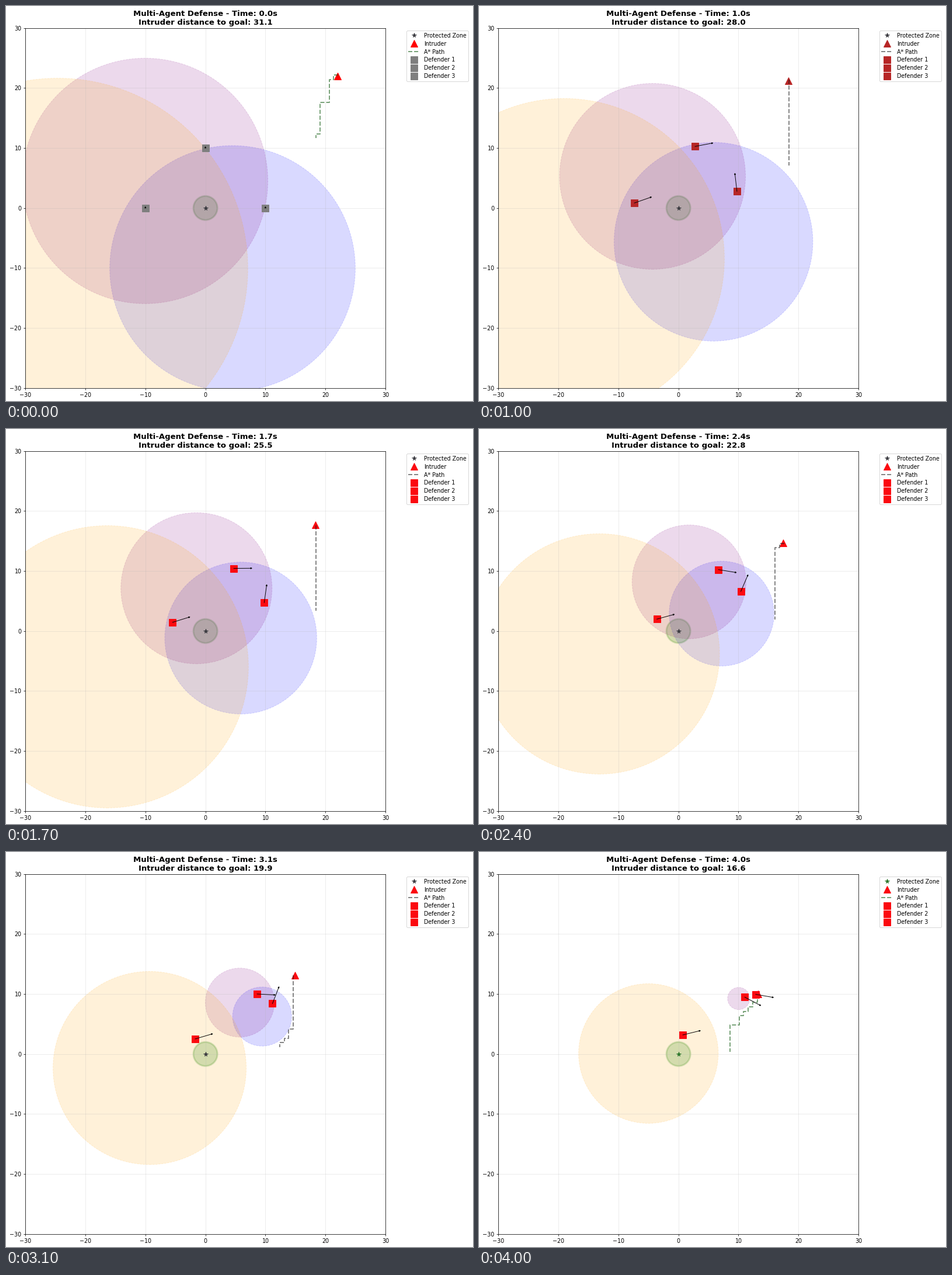
A matplotlib script for the animation above (4100 ms loop, 800 by 676 pixels).

```python
import numpy as np
import matplotlib.pyplot as plt
from matplotlib.animation import FuncAnimation
from matplotlib.patches import Circle, Polygon

DPI = 64
S = 68.4 / DPI          # scale for point sizes
FRAMES, INTERVAL = 41, 100
SPEED = 2.8             # defender speed
RATIO = SPEED / 5.0     # defender speed / intruder speed
CELL = 0.75             # planner grid size
LOOKAHEAD = 19          # planned steps shown

plt.rcParams.update({
    "font.family": "DejaVu Sans", "font.size": 10 * S,
    "axes.linewidth": 0.8 * S, "grid.linewidth": 0.8 * S,
    "patch.linewidth": 1.0 * S, "lines.markeredgewidth": 1.0 * S,
    "axes.titlepad": 6 * S,
})
for axis in ("xtick", "ytick"):
    plt.rcParams.update({f"{axis}.major.size": 3.5 * S,
                         f"{axis}.major.pad": 3.5 * S,
                         f"{axis}.major.width": 0.8 * S})

# Intruder key points: frame, x, y
KEYS = [(0, 22, 22), (8, 18.01, 22.12), (10, 18.3, 21.18),
        (20, 18.37, 16.18), (24, 17.41, 14.69), (31, 14.93, 13.12),
        (40, 13.27, 9.97)]

# Planned route from a given frame on: steps that go left, the rest go down
LEFT_TURNS = {0: (0, 2, 8, 9, 17), 3: (0, 2, 11, 18), 9: (), 21: (0, 2),
              28: (12, 15, 17), 36: (2, 4, 6, 8, 11, 12)}


def intercept(pos, target):
    """First point on the line from intruder to goal the defender can hold."""
    to_goal = -target / np.hypot(*target)
    gap = target - pos
    a, b, c = 1 - RATIO**2, 2 * gap @ to_goal, gap @ gap
    run = (-b - np.sqrt(max(b * b - 4 * a * c, 0))) / (2 * a)
    return target + to_goal * np.clip(run, 0, np.hypot(*target))


def simulate():
    """Positions and headings of the defenders at every frame."""
    pos = np.array([(10.0, 0.0), (0.0, 10.0), (-10.0, 0.0)])
    aim = np.array([(0.0, 1.0)] * 3)
    states = [(pos, aim)]
    for target in intruder_path[:-1]:
        aim = np.array([intercept(p, target) for p in pos]) - pos
        aim /= np.hypot(*aim.T)[:, None] + 1e-9
        pos = pos + aim * SPEED * INTERVAL / 1000
        states.append((pos, aim))
    return states


def route_points(start, frame):
    lefts = LEFT_TURNS[max(k for k in LEFT_TURNS if k <= frame)]
    steps = [(-1, 0) if n in lefts else (0, -1) for n in range(LOOKAHEAD)]
    cell = np.floor(start / CELL) + 0.5
    return CELL * (cell + np.cumsum([(0, 0)] + steps, axis=0))


key_t, key_x, key_y = np.transpose(KEYS)
clock = np.arange(FRAMES)
intruder_path = np.column_stack([np.interp(clock, key_t, key_x),
                                 np.interp(clock, key_t, key_y)])
states = simulate()

fig = plt.figure(figsize=(800 / DPI, 676 / DPI), dpi=DPI, facecolor="white")
ax = fig.add_axes([33.1 / 800, 22.1 / 676, 617 / 800, 616.3 / 676])
ax.set(xlim=(-30, 30), ylim=(-30, 30))
ax.set_xticks(range(-30, 31, 10))
ax.set_yticks(range(-30, 31, 10))
ax.grid(True, alpha=0.3)
title = ax.set_title("", fontsize=14 * S, fontweight="bold")

ax.add_patch(Circle((0, 0), 2, color="green", alpha=0.2, lw=3 * S))
regions = [ax.add_patch(Circle((0, 0), 1, color=c, alpha=0.15, ls="--"))
           for c in ("blue", "purple", "orange")]


def marker(shape, size, label, z):
    return ax.plot([0], [0], shape, ms=size * S, ls="none",
                   label=label, zorder=z)[0]


star = marker("*", 8, "Protected Zone", 2)
intruder = marker("^", 12, "Intruder", 3)
route, = ax.plot([], [], "--", lw=2 * S, alpha=0.55, label="A* Path", zorder=4)
defenders = [marker("s", 12, f"Defender {n}", 5) for n in (1, 2, 3)]
shafts = [ax.plot([], [], color="black", lw=S, zorder=6)[0] for _ in defenders]
heads = [ax.add_patch(Polygon(np.zeros((3, 2)), color="black", zorder=6))
         for _ in defenders]
legend = ax.legend(loc="upper left", bbox_to_anchor=(1.05, 1),
                   labelspacing=0.41, borderpad=0.36)
keys = legend.legend_handles


def paint(i):
    """Colours shift from muted to bright as the chase goes on."""
    late = i >= 36
    alert = "#b72626" if i < 14 else "#fb0a10"
    colours = ["#267326" if late else "#36363c",
               alert if i else "red",
               "#005000" if late or i == 0 else "#181818"]
    colours += [alert if i else "#7f7f7f"] * 3
    artists = [star, intruder, route] + defenders
    for artist, key, colour in zip(artists, keys, colours):
        artist.set_color(colour)
        key.set_color(colour)


def update(i):
    target = intruder_path[i]
    title.set_text(f"Multi-Agent Defense - Time: {i / 10:.1f}s\n"
                   f"Intruder distance to goal: {np.hypot(*target):.1f}")
    intruder.set_data(target[:1], target[1:])
    route.set_data(*route_points(target, i).T)

    k2 = RATIO**2
    for pos, aim, square, region, shaft, head in zip(
            *states[i], defenders, regions, shafts, heads):
        square.set_data(pos[:1], pos[1:])
        # Apollonius circle of points the defender reaches first
        region.set_center((pos - k2 * target) / (1 - k2))
        region.set_radius(RATIO * np.hypot(*(pos - target)) / (1 - k2))
        tip = pos + aim * (SPEED if i else 0)
        side = np.array([-aim[1], aim[0]]) * 0.1
        shaft.set_data(*np.array([pos, tip]).T)
        head.set_xy([tip + side, tip + aim * 0.22, tip - side])
    paint(i)
    return []


anim = FuncAnimation(fig, update, frames=FRAMES, interval=INTERVAL,
                     init_func=lambda: update(0), repeat=True,
                     repeat_delay=0, blit=False)
plt.show()
```
